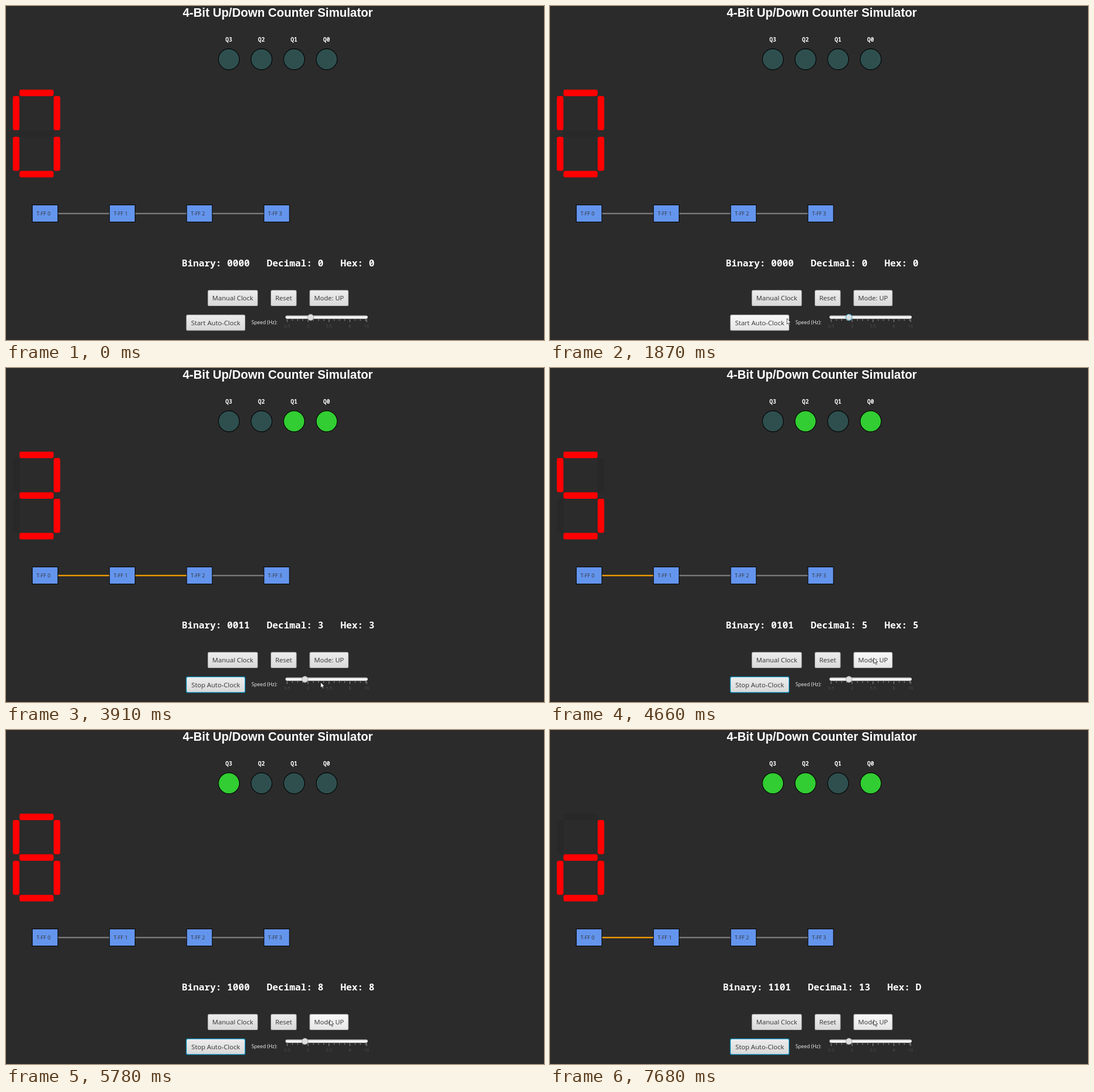
Animation, 949 px wide and 590 px high, one loop 8 s. Source, as an HTML page:

```html
<!DOCTYPE html>
<html lang="en">
<head>
<meta charset="utf-8">
<title>4-Bit Up/Down Counter Simulator</title>
<style>
  html, body { margin: 0; width: 100%; height: 100%; overflow: hidden; background: #2b2b2b; }
  svg { display: block; }
  text { white-space: pre; text-anchor: middle; font-family: "Open Sans", "Noto Sans", sans-serif; }
  .title { font: bold 21.2px "Liberation Sans", Arial, sans-serif; fill: #fff; }
  .mono { font-family: "Noto Sans Mono", "DejaVu Sans Mono", monospace; font-weight: bold; fill: #fff; }
  .ff { font-size: 9.2px; fill: #333; }
  .btn { font-size: 11.6px; fill: #333; }
  .speed { font-size: 8.75px; fill: #f4f4f4; }
  .tick { font-size: 7.9px; fill: #505050; }
</style>
</head>
<body>
<svg id="stage" width="949" height="590" viewBox="0 0 949 590" xmlns="http://www.w3.org/2000/svg">
  <defs>
    <linearGradient id="normal" x2="0" y2="1"><stop stop-color="#ededed"/><stop offset="1" stop-color="#d9d9d9"/></linearGradient>
    <linearGradient id="hover" x2="0" y2="1"><stop stop-color="#f9f9f9"/><stop offset="1" stop-color="#e6e6e6"/></linearGradient>
    <linearGradient id="pressed" x2="0" y2="1"><stop stop-color="#dcdcdc"/><stop offset="1" stop-color="#cbcbcb"/></linearGradient>
    <linearGradient id="track" x2="0" y2="1"><stop stop-color="#c4c4c4"/><stop offset=".5" stop-color="#f2f2f2"/><stop offset="1" stop-color="#fff"/></linearGradient>
  </defs>
</svg>
<script>
const LOOP = 8000;
const FRAME = 125.6;
const AUTO_START = 3135, PERIOD = 377.5;  // counter clock
const stage = document.getElementById('stage');
const clamp01 = v => Math.min(1, Math.max(0, v));

function add(tag, attrs, text) {
  const el = document.createElementNS('http://www.w3.org/2000/svg', tag);
  for (const k in attrs) el.setAttribute(k, attrs[k]);
  if (text !== undefined) el.textContent = text;
  stage.appendChild(el);
  return el;
}
const label = (cls, x, y, text) => add('text', { class: cls, x, y }, text);
const box = (x, y, width, height, rx, more) => add('rect', { x, y, width, height, rx, ...more });

label('title', 479.4, 18.8, '4-Bit Up/Down Counter Simulator');

// LEDs, most significant bit first
const leds = [3, 2, 1, 0].map((bit, i) => {
  const cx = 393.2 + i * 57.5;
  label('mono', cx - 0.2, 63.3, 'Q' + bit).setAttribute('font-size', 10);
  return { bit, el: add('circle', { cx, cy: 94.1, r: 18.5, stroke: '#000', 'stroke-width': 1.1 }) };
});

// Seven-segment display: three flat bars, then four upright ones
const glyphs = ['abcdef', 'bc', 'abdeg', 'abcdg', 'bcfg', 'acdfg', 'acdefg', 'abc',
  'abcdefg', 'abcdfg', 'abcefg', 'cdefg', 'adef', 'bcdeg'];
const segs = [
  ...[...'agd'].map((id, i) => ({ id, el: box(23.7, 147.7 + i * 71.8, 60.3, 11.5, 3.4) })),
  ...[...'fbec'].map((id, i) => ({ id, el: box(12.1 + i % 2 * 71.9, 159.1 + (i >> 1) * 71.8, 11.6, 60.3, 3.4) }))
];

// Flip-flop chain
const ffX = i => 46.4 + i * 136.2;
const wires = [0, 1, 2].map(i =>
  add('line', { x1: ffX(i) + 45, x2: ffX(i + 1), y1: 366.6, y2: 366.6, 'stroke-width': 2.4 }));
for (let i = 0; i < 4; i++) {
  box(ffX(i), 351.5, 45, 30, 0, { fill: '#6495ed', stroke: '#000' });
  label('ff', ffX(i) + 19.7, 369.6, 'T-FF ' + i);
}

const readout = label('mono', 480, 459.8, '');
readout.setAttribute('font-size', 16.67);

// Buttons
function button(x, y, w, text) {
  const edge = box(x, y, w, 28.3, 2.6, { 'stroke-width': 1.6 });
  const body = box(x + 1, y + 1, w - 2, 26.3, 2);
  const cap = label('btn', x + w / 2, y + 18.3, text);
  return (look, focus, caption = text) => {
    body.setAttribute('fill', `url(#${look})`);
    edge.setAttribute('fill', focus ? '#039ed3' : '#b4b4b4');
    edge.setAttribute('stroke', focus ? '#039ed338' : 'none');
    cap.textContent = caption;
  };
}
button(355.8, 501.8, 88.4, 'Manual Clock')('normal', false);
button(467, 501.8, 45.6, 'Reset')('normal', false);
const mode = button(535.4, 501.8, 68.8, 'Mode: UP');
const auto = button(317.8, 545.2, 104.2, 'Start Auto-Clock');

// Speed slider
label('speed', 455.8, 562.3, 'Speed (Hz):');
const hzX = hz => 496 + (hz - 0.5) * 14.75;
function tick(hz, major) {
  const x = hzX(hz);
  add('line', { x1: x, x2: x, y1: 553.4, y2: major ? 558.2 : 556, stroke: '#b0b0b0', 'stroke-width': .9 });
  if (major) label('tick', x, 567.8, hz);
}
for (let n = 0; n < 16; n++) tick(0.5 + n * 0.625, n % 4 === 0);
tick(10, true);
box(493, 546.8, 145, 5.6, 2.8, { fill: 'url(#track)' });
const thumb = add('circle', { cy: 550, r: 5.4 });

const cursor = add('path', {
  d: 'M0 0V10L2.3 7.9L3.9 11.6L5.5 10.9L3.9 7.3H7Z',
  fill: '#fff', stroke: '#000', 'stroke-width': .7
});

// Key points of the pointer: time, x, y
const path = [
  [126, 751, 574], [251, 621.5, 565], [628, 536, 548], [1130, 536, 548], [1507, 490.5, 540],
  [1633, 490.5, 540], [1884, 418, 552], [2386, 405, 556], [2888, 405, 556], [3014, 498, 554],
  [3517, 556, 559], [3894, 555, 555], [4271, 555, 555], [4522, 571, 512], [LOOP, 571, 512]
];
function pointer(t) {
  const i = path.findIndex(p => p[0] > t);
  const [t0, x0, y0] = path[i - 1], [t1, x1, y1] = path[i];
  const k = (t - t0) / (t1 - t0);
  return [x0 + (x1 - x0) * k, y0 + (y1 - y0) * k];
}

function draw(t) {
  const n = Math.max(0, Math.floor((t - AUTO_START) / PERIOD) + 1);
  for (const { bit, el } of leds) el.setAttribute('fill', n >> bit & 1 ? '#32cd32' : '#2f4f4f');
  for (const { id, el } of segs) el.setAttribute('fill', glyphs[n].includes(id) ? '#f00' : '#282828');
  wires.forEach((w, i) => {
    const mask = (2 << i) - 1;
    w.setAttribute('stroke', (n & mask) === mask ? '#ffa500' : '#808080');
  });
  const bin = n.toString(2).padStart(4, '0');
  readout.textContent = `Binary: ${bin}   Decimal: ${n}   Hex: ${n.toString(16).toUpperCase()}`;

  const q = Math.floor((t + 16) / FRAME) * FRAME + 1;
  const shown = q > path[0][0];
  const [x, y] = shown ? pointer(q) : [0, 0];
  cursor.setAttribute('visibility', shown ? 'visible' : 'hidden');
  cursor.setAttribute('transform', `translate(${x.toFixed(1)} ${y.toFixed(1)})`);

  const over = x > 318 && x < 422, down = q > 2750 && q < 2880;
  auto(down ? 'pressed' : over ? 'hover' : 'normal', q > 2750, q < 2880 ? 'Start Auto-Clock' : 'Stop Auto-Clock');
  mode(x > 535 && y < 530 && shown ? 'hover' : 'normal', false);

  const focus = q > 1250 && q < 2750;
  thumb.setAttribute('cx', 537.4 - 10.1 * clamp01((q - 1130) / 251));
  thumb.setAttribute('fill', q > 620 && q < 1490 ? '#f4f4f4' : '#dedede');
  thumb.setAttribute('stroke', focus ? '#5fb4d3' : '#a9a9a9');
  thumb.setAttribute('stroke-width', focus ? 1.4 : .9);
}

const start = performance.now();
function loop() {
  draw((performance.now() - start) % LOOP);
  requestAnimationFrame(loop);
}
loop();
</script>
</body>
</html>
```
